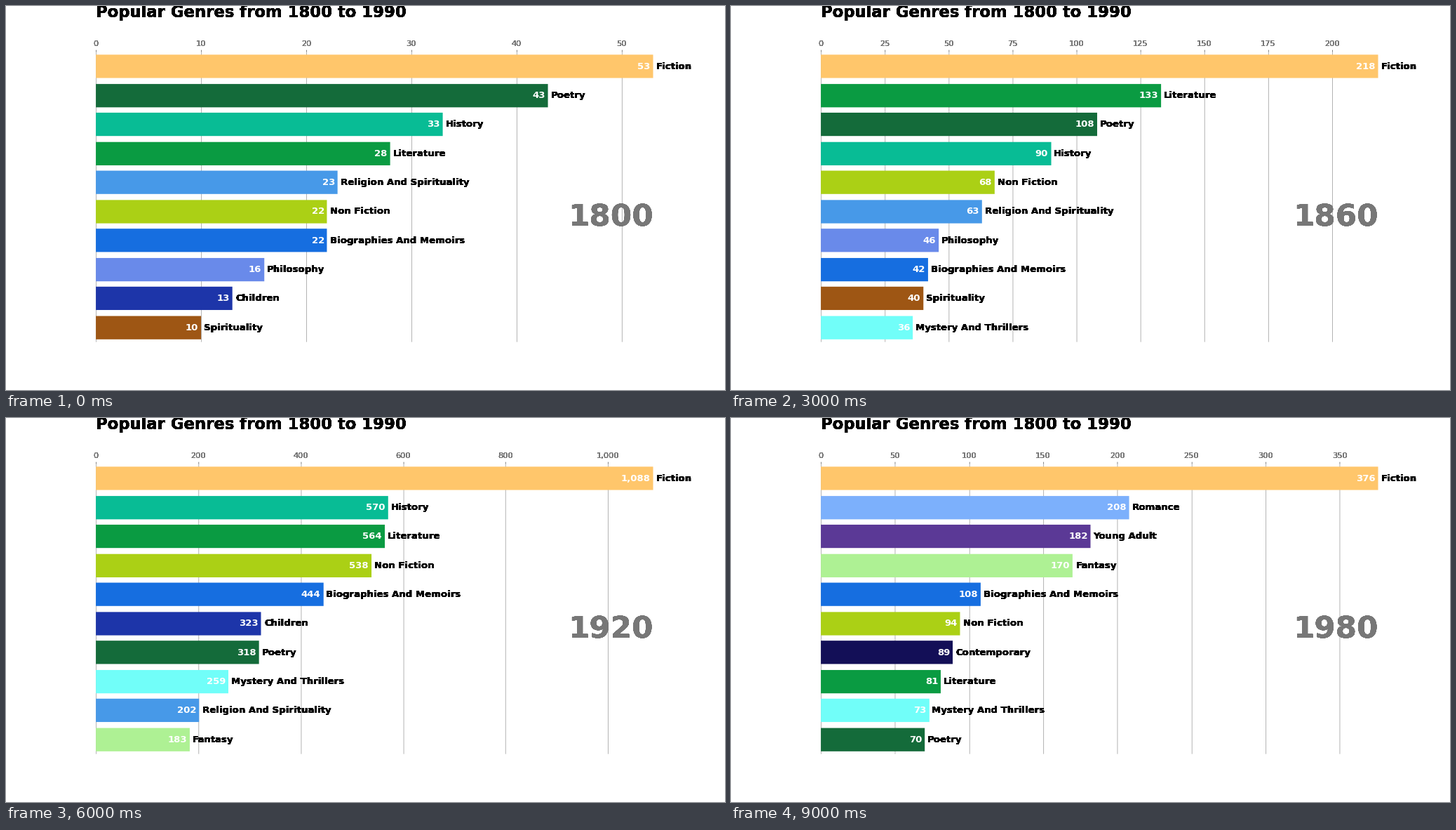
Recreate the animation shown at these times as a matplotlib script. Size 1025 by 547 pixels, loop 10000 ms.

```python
import matplotlib.pyplot as plt
import numpy as np
from matplotlib.animation import FuncAnimation
from matplotlib.colors import to_rgb
from matplotlib.patches import Rectangle
from matplotlib.ticker import MaxNLocator

WIDTH, HEIGHT = 1025, 547
DPI = HEIGHT / 8

# The chart is laid out on a 1080 x 576 grid and scaled down to the stage
GRID_W, GRID_H = 1080, 576
LEFT, RIGHT = 0.125 * GRID_W, 0.9 * GRID_W
TOP, BOTTOM = 0.12 * GRID_H, 0.875 * GRID_H
PLOT_W, PLOT_H = RIGHT - LEFT, BOTTOM - TOP
ROW = PLOT_H / (9.8 * 1.02)
FIRST_ROW = TOP + 0.498 * ROW
GAP = PLOT_W / 200

GREY, LINE = "#777777", "#b0b0b0"
FIRST_YEAR, YEAR_STEP = 1800, 20
LOCATOR = MaxNLocator(9, steps=[1, 2, 2.5, 5, 10])

COLORS = {
    "Fiction": "#ffc66b",
    "Poetry": "#146b3a",
    "History": "#08bc95",
    "Literature": "#0a9b42",
    "Religion And Spirituality": "#4799e8",
    "Non Fiction": "#abd015",
    "Biographies And Memoirs": "#166ee0",
    "Philosophy": "#698aea",
    "Children": "#1d35a9",
    "Spirituality": "#9e5614",
    "Mystery And Thrillers": "#71fef9",
    "Fantasy": "#aef194",
    "Romance": "#7cb0fc",
    "Young Adult": "#5b3996",
    "Comics": "#56aa26",
    "Contemporary": "#130f57",
}
(FIC, POE, HIS, LIT, REL, NON, BIO, PHI,
 CHI, SPI, MYS, FAN, ROM, YOU, COM, CON) = COLORS

# Ten leading genres per step, largest first
RANKINGS = [
    {FIC: 53, POE: 43, HIS: 33, LIT: 28, REL: 23,
     NON: 22, BIO: 22, PHI: 16, CHI: 13, SPI: 10},
    {FIC: 69, LIT: 41, HIS: 37, POE: 36, NON: 28,
     BIO: 28, REL: 27, CHI: 23, PHI: 15, SPI: 12},
    {FIC: 123, LIT: 74, POE: 62, HIS: 58, NON: 44,
     REL: 41, BIO: 34, CHI: 27, PHI: 26, SPI: 22},
    {FIC: 218, LIT: 133, POE: 108, HIS: 90, NON: 68,
     REL: 63, PHI: 46, BIO: 42, SPI: 40, MYS: 36},
    {FIC: 407, LIT: 244, HIS: 201, POE: 164, NON: 159,
     BIO: 122, REL: 100, CHI: 85, PHI: 77, MYS: 75},
    {FIC: 674, LIT: 399, HIS: 399, NON: 330, BIO: 313,
     POE: 221, CHI: 217, REL: 140, MYS: 138, PHI: 115},
    {FIC: 1088, HIS: 570, LIT: 564, NON: 538, BIO: 444,
     CHI: 323, POE: 318, MYS: 259, REL: 202, FAN: 183},
    {FIC: 1578, NON: 877, HIS: 813, LIT: 797, BIO: 631,
     MYS: 486, CHI: 480, POE: 457, FAN: 377, REL: 291},
    {FIC: 1420, LIT: 599, NON: 543, BIO: 441, FAN: 435,
     ROM: 392, MYS: 390, HIS: 335, YOU: 299, COM: 276},
    {FIC: 376, ROM: 208, YOU: 182, FAN: 170, BIO: 108,
     NON: 94, CON: 89, LIT: 81, MYS: 73, POE: 70},
]


def heavy_edges(color, gain=4):
    """Return a filter that fills out the soft edges of text."""
    rgb = np.round(np.array(to_rgb(color)) * 255)

    def apply(image, dpi):
        out = np.zeros(image.shape, np.uint8)
        out[..., :3] = rgb
        out[..., 3] = np.minimum(image[..., 3] * gain, 1) * 255
        return out, 0, 0

    return apply


def heavy_text(x, y, text, color="black", **style):
    ax.text(x, y, text, color=color, agg_filter=heavy_edges(color), **style)


def box(x0, y0, x1, y1, color):
    """Fill a box whose corners lie on whole grid units."""
    x0, y0, x1, y1 = (np.floor(v + 0.5) for v in (x0, y0, x1, y1))
    ax.add_patch(Rectangle((x0, y0), x1 - x0, y1 - y0, facecolor=color,
                           linewidth=0, snap=False))


def draw_scale(top_value):
    for tick in LOCATOR.tick_values(0, top_value):
        if tick > top_value:
            break
        x = LEFT + PLOT_W * tick / top_value
        box(x, TOP, x + 1, BOTTOM, LINE)
        box(x, TOP - 3.5, x + 1, TOP, GREY)
        heavy_text(x, TOP - 7, f"{tick:,.0f}", GREY, size=12,
                   ha="center", va="bottom")


def draw(step):
    ranking = RANKINGS[step]
    top_value = max(ranking.values())

    ax.clear()
    ax.set(xlim=(0, GRID_W), ylim=(GRID_H, 0))
    ax.axis("off")
    draw_scale(top_value)

    for row, (name, value) in enumerate(ranking.items()):
        y = FIRST_ROW + ROW * row
        end = LEFT + PLOT_W * value / top_value
        box(LEFT, y - 0.4 * ROW, end, y + 0.4 * ROW, COLORS[name])
        ax.text(end - GAP, y, f"{value:,}", color="white", size=14,
                weight="bold", ha="right", va="center")
        heavy_text(end + GAP, y, name, size=14, weight="bold", va="center")

    heavy_text(RIGHT, BOTTOM - 0.4 * PLOT_H,
               str(FIRST_YEAR + YEAR_STEP * step), GREY, size=46,
               weight="bold", ha="right")
    heavy_text(LEFT, BOTTOM - 1.12 * PLOT_H,
               "Popular Genres from 1800 to 1990", size=24, weight="bold")


plt.rcParams["font.family"] = "DejaVu Sans"
# The small margin guards against rounding down to one pixel less
fig = plt.figure(figsize=((WIDTH + 0.01) / DPI, (HEIGHT + 0.01) / DPI),
                 dpi=DPI, facecolor="white")
ax = fig.add_axes([0, 0, 1, 1])

anim = FuncAnimation(fig, draw, frames=len(RANKINGS), interval=1000,
                     repeat=True, repeat_delay=0)
plt.show()
```
